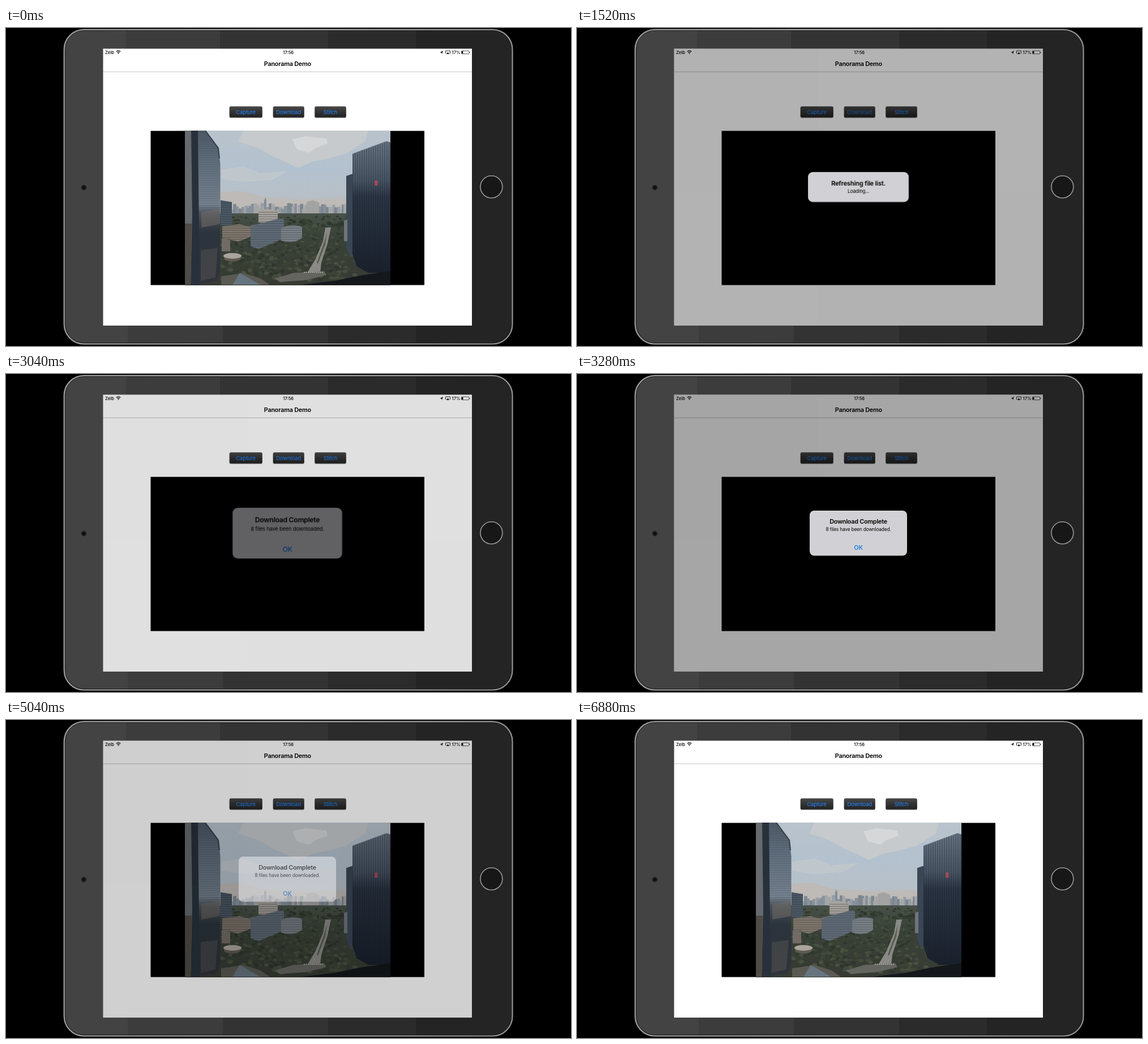
Animation of 998 by 561 pixels, one loop 6960 ms. Source, as an HTML page:

```html
<!DOCTYPE html>
<html lang="en">
<head>
<meta charset="utf-8">
<title>Panorama Demo</title>
<style>
html, body { margin: 0; width: 100%; height: 100%; overflow: hidden; background: #000; }
svg { display: block; width: 998px; height: 561px; font-family: Inter, Roboto, sans-serif; }
text { letter-spacing: -.02em; }
.mid { text-anchor: middle; }
.status { font-size: 7.6px; font-weight: 500; letter-spacing: 0; }
.title { font-size: 10.8px; font-weight: 600; }
.note { font-size: 8.3px; }
.label { font-size: 9.5px; fill: #1f85ff; }
.ok { font-size: 10.8px; font-weight: 500; fill: #0a74e8; }
.card { fill: #d1d1d5; }
.alert { opacity: 0; transform-origin: 497px 280.5px; }

#photo, #dim, #tap, #refresh, #load, #done, #doneCard, #doneFoot, #count {
  animation: 6960ms step-end infinite;
}
#photo { animation-name: photo; }
#dim { animation-name: dim; }
#tap { animation-name: tap; }
#refresh { animation-name: refresh; }
#load { animation-name: load; }
#done { animation-name: done; }
#doneCard { animation-name: card; }
#doneFoot { animation-name: foot; }
#count { animation-name: count; }

@keyframes photo {
  0% { opacity: 1; } 19.53% { opacity: 0; } 52.87%, 100% { opacity: 1; }
}
@keyframes dim {
  0% { opacity: 0; }
  20.68% { opacity: .125; } 21.83% { opacity: .3; } 22.98% { opacity: .35; }
  26.43% { opacity: .185; }
  27.58% { opacity: .125; } 28.73% { opacity: .3; } 29.88% { opacity: .35; }
  42.52% { opacity: .14; }
  43.67% { opacity: .125; } 44.82% { opacity: .3; } 45.97% { opacity: .35; }
  72.41% { opacity: .185; } 73.56% { opacity: .06; } 74.71%, 100% { opacity: 0; }
}
@keyframes tap {
  0% { opacity: 1; } 19.53% { opacity: .72; } 22.98%, 100% { opacity: 1; }
}
@keyframes refresh {
  0% { opacity: 0; transform: none; }
  20.68% { opacity: .47; transform: scale(1.125); }
  21.83% { opacity: 1; transform: scale(1.034); }
  22.98% { opacity: 1; transform: none; }
  26.43% { opacity: .45; }
  27.58%, 100% { opacity: 0; transform: none; }
}
@keyframes load {
  0% { opacity: 0; transform: none; }
  27.58% { opacity: .47; transform: scale(1.125); }
  28.73% { opacity: 1; transform: scale(1.034); }
  29.88% { opacity: 1; transform: none; }
  42.52% { opacity: .35; }
  43.67%, 100% { opacity: 0; transform: none; }
}
@keyframes done {
  0% { opacity: 0; transform: none; }
  43.67% { opacity: .47; transform: scale(1.125); }
  44.82% { opacity: 1; transform: scale(1.034); }
  45.97% { opacity: 1; transform: none; }
  72.41% { opacity: .5; } 73.56% { opacity: .17; }
  74.71%, 100% { opacity: 0; transform: none; }
}
@keyframes card {
  0% { fill: #d1d1d5; } 52.87%, 100% { fill: #f3f3f6; }
}
@keyframes foot {
  0% { opacity: 0; } 52.87% { opacity: 1; } 72.41%, 100% { opacity: 0; }
}
@keyframes count {
  0% { transform: none; }
  27.58% { transform: none; animation-timing-function: steps(7, end); }
  43.67%, 100% { transform: translateY(-140px); }
}
</style>
</head>
<body>
<svg viewBox="0 0 998 561" xmlns="http://www.w3.org/2000/svg">
  <defs>
    <linearGradient id="rim" x2="1" y2="0">
      <stop stop-color="#9c9c9c"/><stop offset=".5" stop-color="#b0b0b0"/><stop offset="1" stop-color="#929292"/>
    </linearGradient>
    <linearGradient id="key" x2="0" y2="1">
      <stop stop-color="#484848"/><stop offset=".5" stop-color="#343434"/><stop offset="1" stop-color="#222"/>
    </linearGradient>
    <linearGradient id="sky" x2="0" y2="1">
      <stop stop-color="#b9c3cc"/><stop offset=".45" stop-color="#b3c1ce"/>
      <stop offset=".75" stop-color="#b7c0c8"/><stop offset="1" stop-color="#bcb9b6"/>
    </linearGradient>
    <linearGradient id="glass" x2="0" y2="1">
      <stop stop-color="#4c5967"/><stop offset=".2" stop-color="#5f6d7c"/>
      <stop offset=".48" stop-color="#74808d"/><stop offset=".54" stop-color="#4a535d"/>
      <stop offset=".66" stop-color="#2c343d"/><stop offset="1" stop-color="#30343a"/>
    </linearGradient>
    <linearGradient id="tower" x2="0" y2="1">
      <stop stop-color="#6a7684"/><stop offset=".3" stop-color="#4a5665"/>
      <stop offset=".42" stop-color="#2b3543"/><stop offset="1" stop-color="#1a212c"/>
    </linearGradient>
    <linearGradient id="ground" x2="0" y2="1">
      <stop stop-color="#48524a"/><stop offset=".3" stop-color="#3a4338"/><stop offset="1" stop-color="#363a33"/>
    </linearGradient>
    <pattern id="bars" width="4" height="8" patternUnits="userSpaceOnUse">
      <path d="M1 0V8" stroke="#141c28" stroke-opacity=".4" stroke-width="1.4"/>
    </pattern>
    <pattern id="rows" width="8" height="4" patternUnits="userSpaceOnUse">
      <path d="M0 1H8" stroke="#262c33" stroke-opacity=".35" stroke-width="1.5"/>
    </pattern>
    <clipPath id="body"><rect x="103" y="3" width="791" height="554" rx="34"/></clipPath>
    <clipPath id="view"><rect x="316" y="181.5" width="363" height="272"/></clipPath>
    <clipPath id="line"><rect x="440" y="281" width="114" height="13"/></clipPath>
    <clipPath id="doneClip"><rect x="411" y="241" width="172" height="79.5" rx="8"/></clipPath>
  </defs>

  <!-- tablet -->
  <g clip-path="url(#body)">
    <path fill="#434343" d="M100 0H898V561H100z"/>
    <path fill="#3c3c3c" d="M212 0H898V561H215V280H212z"/>
    <path fill="#333" d="M378 0H898V561H383V280H378z"/>
    <path fill="#2b2b2b" d="M569 0H898V561H569z"/>
    <path fill="#242424" d="M724 0H898V561H724z"/>
  </g>
  <rect x="104.5" y="4.5" width="788" height="551" rx="33" fill="none" stroke="#1b1b1b"/>
  <rect x="102.7" y="2.9" width="791.8" height="554.6" rx="35" fill="none" stroke="url(#rim)" stroke-width="2.2"/>
  <circle cx="137.5" cy="281.5" r="4.7" fill="#202020"/>
  <circle cx="137.5" cy="281.5" r="2.4" fill="#0b0b0b"/>
  <circle cx="857.4" cy="280.3" r="19.5" fill="#171717" stroke="#999" stroke-width="1.6"/>

  <!-- app -->
  <rect x="171.5" y="36.5" width="651.5" height="488.5" fill="#fff"/>
  <path d="M172 77.3H823" stroke="#c4c4c4"/>
  <g id="keys"></g>
  <rect x="255.5" y="181.5" width="483.5" height="272" fill="#000"/>
  <g id="photo" clip-path="url(#view)">
    <rect x="316" y="181" width="363" height="150" fill="url(#sky)"/>
    <path fill="#c6cacd" d="M420 181H640L634 200L600 222L570 230L540 236L516 247L494 236L470 226L446 212L410 200z"/>
    <path fill="#d6d7d8" d="M506 196L530 191L566 195L568 204L546 212L536 220L514 214L510 206z"/>
    <path fill="#bfc7cd" d="M380 250L420 244L450 256L500 252L470 268L420 272L380 266z"/>
    <path fill="#bdbab7" d="M378 289L420 288L450 298L520 303L602 300V330H378z"/>
    <g id="city"></g>
    <rect x="316" y="327" width="363" height="127" fill="url(#ground)"/>
    <g id="trees"></g>
    <path fill="#4b5865" d="M379 304L399 307V348H379z"/>
    <path fill="#a9a49e" d="M446 322L462 319L480 323V343H446z"/>
    <path fill="#82786d" d="M382 350L412 346L433 351V368L410 377L382 370z"/>
    <path fill="#626c78" d="M432 349L488 335L491 337V371L446 390L432 385z"/>
    <path fill="#7b8288" d="M486 353Q506 344 523 351V370Q508 382 486 375z"/>
    <path fill="#726b65" d="M381 371L396 369V394H381z"/>
    <path fill="url(#rows)" d="M382 350L412 346L433 351L488 335L491 337V371L446 390L382 370zM486 353Q506 344 523 351V370Q508 382 486 375zM446 322H480V343H446zM379 304L399 307V348H379z"/>
    <path fill="#8a8986" d="M564 352H574L568 380L557 414L555 432H532L547 407L560 376z"/>
    <path fill="#565c50" d="M567 360L564 382L551 416L549 414L562 378z"/>
    <path fill="#65655f" d="M508 432L562 429L566 436L528 445L484 448L474 442z"/>
    <path d="M526 431H560" stroke="#a5a5a2" stroke-width="2" stroke-dasharray="2 1.5"/>
    <path fill="#5a5952" d="M380 438L420 432L450 442L466 453H380z"/>
    <ellipse cx="400" cy="406" rx="15" ry="6" fill="#5f5a52"/>
    <ellipse cx="400" cy="402" rx="16" ry="5" fill="#aaa59c"/>
    <path fill="#66747f" d="M400 453L413 432L449 453z"/>
    <path fill="#3a4654" d="M601 261L613 257V400H607L601 388z"/>
    <path fill="#6d747c" d="M597 340L603 338V376H597z"/>
    <path fill="url(#tower)" d="M612 222L672 200L679 202V432L640 432L619 420L612 398z"/>
    <path fill="url(#bars)" d="M612 222L672 200L679 202V432L640 432L619 420L612 398z"/>
    <path d="M612 222L672 200L679 202" fill="none" stroke="#75808c"/>
    <rect x="651.5" y="269" width="5" height="9" fill="#a8485a"/>
    <path fill="url(#glass)" d="M338 181H352L375 212L378.5 240V430L372 446L338 453z"/>
    <path fill="url(#rows)" opacity=".35" d="M338 181H352L375 212L378.5 240V430L372 446L338 453z"/>
    <path fill="#776e66" opacity=".5" d="M345 325L378 319V346L345 352z"/>
    <path fill="#5c5a57" opacity=".4" d="M344 392L374 388L370 440L344 446z"/>
    <path d="M352 181L375 212L377 230" fill="none" stroke="#343e49" stroke-width="2"/>
    <path fill="#28313b" d="M327 181H339L342 453H327z"/>
    <path fill="#666a6e" d="M316 181H327L329 330L326 453H316z"/>
    <path fill="#4f4b46" d="M316 345H328L326 453H316z"/>
    <path fill="#14171b" d="M522 453L580 446L630 436L679 429V453z"/>
  </g>
  <rect id="dim" x="171.5" y="36.5" width="651.5" height="488.5" opacity="0"/>

  <!-- bars keep full contrast -->
  <text class="status" x="175" y="45.8">Zelb</text>
  <g fill="none" stroke="#111" stroke-width="1.2">
    <path d="M194.6 41.6Q198.5 38.2 202.4 41.6M196.2 43.4Q198.5 41.3 200.8 43.4"/>
    <path d="M777.6 44.8H776.6V40.2H784.4V44.8H783.4" stroke-width=".9"/>
    <rect x="804.4" y="40.3" width="13.4" height="5.4" rx="1" stroke-width=".7"/>
  </g>
  <path fill="#111" d="M197.2 44.5Q198.5 43.6 199.8 44.5L198.5 46zM766.4 43.2L772 40L770 46L769.2 43.4zM780.5 42.6L783 46H778zM805 41H807.4V45H805zM818.4 42H819.3V44H818.4z"/>
  <text class="status mid" x="498.7" y="45.8">17:56</text>
  <text class="status" x="787.5" y="45.8">17%</text>
  <text class="title mid" x="497.3" y="66.9">Panorama Demo</text>

  <!-- alerts -->
  <g id="refresh" class="alert">
    <rect class="card" x="411" y="255" width="172" height="51" rx="8"/>
    <text class="title mid" x="497" y="278">Refreshing file list.</text>
    <text class="note mid" x="497" y="290.7">Loading...</text>
  </g>
  <g id="load" class="alert">
    <rect class="card" x="411" y="255" width="172" height="51" rx="8"/>
    <text class="title mid" x="497" y="278">Downloading...</text>
    <g clip-path="url(#line)"><g id="count"></g></g>
  </g>
  <g id="done" class="alert">
    <rect id="doneCard" class="card" x="411" y="241" width="172" height="79.5" rx="8"/>
    <g id="doneFoot" clip-path="url(#doneClip)">
      <path fill="#e3e3e5" d="M411 307H583V321H411z"/>
      <path d="M411 292.3H583" stroke="#cfcfd2"/>
    </g>
    <text class="title mid" x="497" y="264">Download Complete</text>
    <text class="note mid" x="497" y="276.6">8 files have been downloaded.</text>
    <text class="ok mid" x="497" y="310">OK</text>
  </g>
</svg>
<script>
const byId = id => document.getElementById(id);

function add(parent, tag, attrs, text = '') {
  const el = document.createElementNS('http://www.w3.org/2000/svg', tag);
  for (const name in attrs) el.setAttribute(name, attrs[name]);
  el.textContent = text;
  parent.append(el);
  return el;
}

let seed = 11;
function rand(min, max) {
  seed = (seed * 16807) % 2147483647;
  return min + (max - min) * seed / 2147483647;
}
const pick = list => list[Math.floor(rand(0, list.length))];

function button(x, width, label) {
  const keys = byId('keys');
  add(keys, 'rect', { x, y: 139.5, width, height: 19.5, rx: 2.5, fill: '#a8a8a8' });
  add(keys, 'rect', { x, y: 138.3, width, height: 19.4, rx: 2.5, fill: 'url(#key)' });
  return add(keys, 'text', { class: 'label mid', x: x + width / 2 - .1, y: 151.7 }, label);
}
button(394.7, 58, 'Capture');
button(471.7, 55, 'Download').id = 'tap';
button(545.3, 55.5, 'Stitch');

for (let n = 1; n <= 7; n++) {
  add(byId('count'), 'text', { class: 'note mid', x: 497, y: 290.5 + (n - 1) * 20 }, `Download (${n}/8)`);
}

// distant skyline
for (let x = 398; x < 604; x += rand(3, 6)) {
  const height = rand(9, 20);
  add(byId('city'), 'rect', {
    x, y: 329 - height, width: rand(4, 8), height,
    fill: pick(['#87919b', '#979ea5', '#7c8791', '#a5a6a6'])
  });
}
add(byId('city'), 'path', { d: 'M456 329V304L458 299L460 304V329z', fill: '#828e9b' });
add(byId('city'), 'path', { d: 'M531 329V307L542 304L553 308V329z', fill: '#a3a3a3' });

function grow(left, top, right, bottom, count) {
  for (let i = 0; i < count; i++) {
    const depth = i / count;
    add(byId('trees'), 'ellipse', {
      cx: rand(left, right), cy: top + (bottom - top) * depth,
      rx: 2 + 3 * depth, ry: 1.2 + 2 * depth,
      fill: pick(['#333c30', '#3b4436', '#434b3b', '#2f362d', '#4a5040'])
    });
  }
}
grow(380, 331, 605, 350, 110);
grow(380, 350, 620, 446, 420);
</script>
</body>
</html>
```
